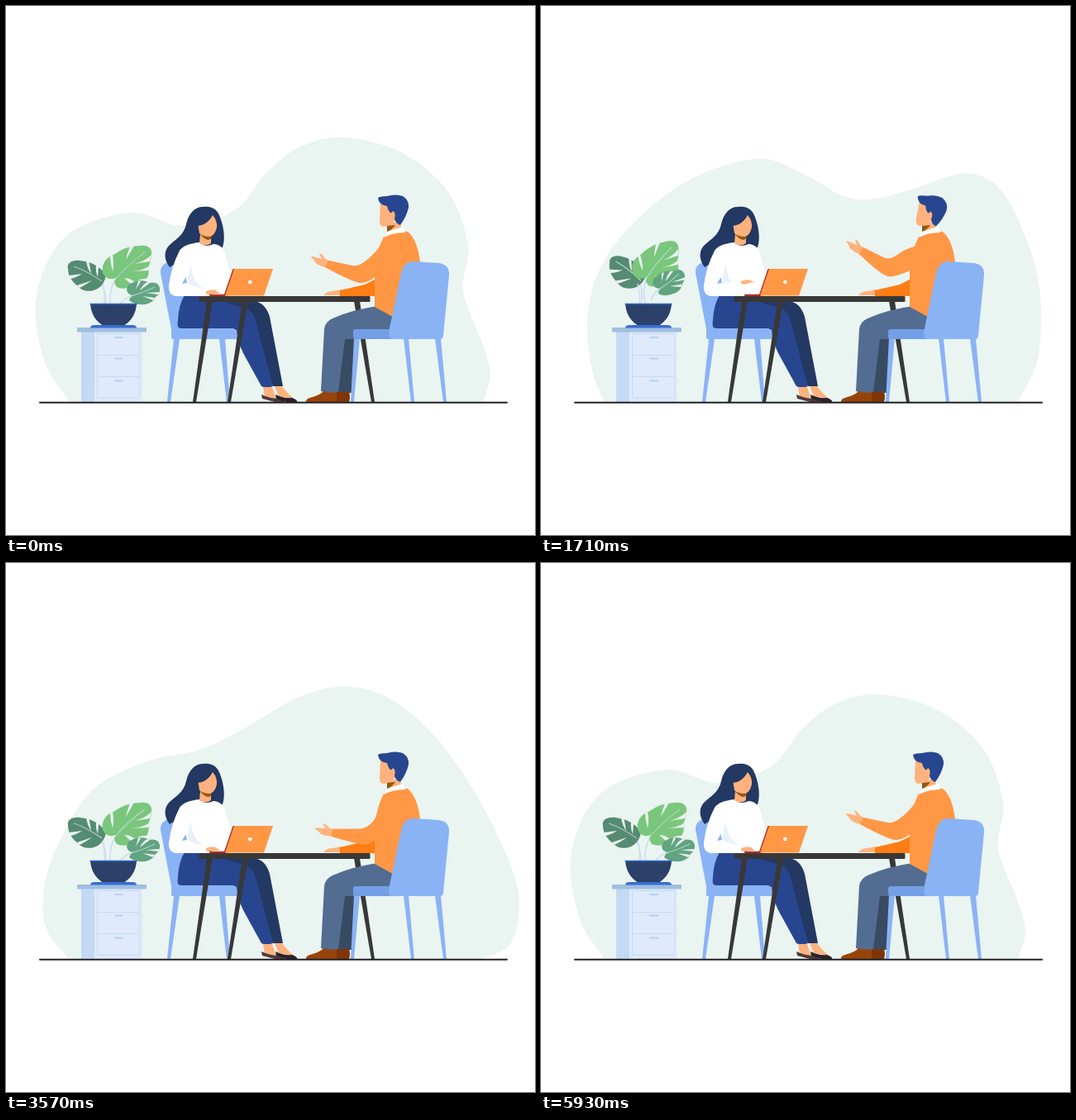
Animation of 640 by 640 pixels, one loop 6.07 s. Source, as an HTML page with a canvas:

```html
<!DOCTYPE html>
<html lang="en">
<head>
<meta charset="utf-8">
<title>Office talk</title>
<style>
html, body { margin: 0; width: 100%; height: 100%; overflow: hidden; background: #fff; }
canvas { display: block; width: 100vw; height: 100vh; }
</style>
</head>
<body>
<canvas id="stage" width="640" height="640"></canvas>
<script>
const ctx = document.getElementById('stage').getContext('2d');
const LOOP = 6070, SWAY = 3035;
const MINT = '#eaf4f1', SKY = '#8ab3f5', NAVY = '#233862', BLUE = '#284690';
const SKIN = '#ffb27d', ORANGE = '#ff9745', CHAR = '#383838', SHADE = '#915a10';

const clamp = u => Math.min(1, Math.max(0, u));
const mix = (a, b, u) => a + (b - a) * u;
const easeIn = u => u ** 3;
const easeOut = u => 1 - (1 - u) ** 3;
const ease = u => (u = clamp(u), u < .5 ? 4 * u ** 3 : 1 - 4 * (1 - u) ** 3);
// Rises around `up` and falls around `down`, each taking `len` ms.
const pulse = (t, up, down, len) => ease((t - up) / len + .5) - ease((t - down) / len + .5);

function fill(color, d) {
  ctx.fillStyle = color;
  ctx.fill(new Path2D(d));
}
function line(color, width, d) {
  ctx.strokeStyle = color;
  ctx.lineWidth = width;
  ctx.stroke(new Path2D(d));
}
function box(color, x, y, w, h, r = 0) {
  ctx.fillStyle = color;
  ctx.beginPath();
  ctx.roundRect(x, y, w, h, r);
  ctx.fill();
}
function turned(x, y, degrees, draw) {
  ctx.save();
  ctx.translate(x, y);
  ctx.rotate(degrees * Math.PI / 180);
  draw();
  ctx.restore();
}
// A tapering leg from (x, top) down to the floor at foot.
function post(color, x, top, foot, w = 7) {
  fill(color, `M${x},${top}h${w}L${foot + 4},479h-4z`);
}

// Background shape: outline from the left floor corner to the right one.
const hills = [46,428, 37,350, 72,279, 150,250, 213,266, 277,247, 315,202, 355,171,
  407,159, 478,177, 535,225, 559,290, 553,345, 575,405, 586,445];
const rising = [55,432, 46,365, 65,300, 120,248, 195,224, 255,234, 308,239, 352,218,
  395,193, 455,183, 520,200, 560,250, 568,310, 580,370, 591,425];
const wave = [62,440, 57,375, 76,310, 125,250, 190,204, 265,182, 320,202, 365,230,
  400,236, 445,225, 512,203, 555,220, 588,280, 605,345, 602,425];
const dome = [53,438, 49,395, 65,320, 110,256, 195,221, 265,208, 320,190, 370,179,
  425,175, 475,182, 525,209, 570,264, 600,330, 616,390, 607,452];
const peak = [49,445, 45,398, 62,345, 105,276, 170,242, 235,227, 295,195, 350,161,
  403,146, 455,158, 505,196, 555,260, 600,342, 621,405, 612,460];
const morphs = [
  [0, 1140, hills, rising, easeIn],
  [1140, 2050, rising, wave, easeOut],
  [2050, 3070, wave, dome, easeIn],
  [3070, 4050, dome, peak, easeOut],
  [4050, 5950, peak, hills, ease],
  [5950, LOOP, hills, hills, ease]
];

function backdrop(t) {
  const [from, to, a, b, curve] = morphs.find(m => t < m[1]) || morphs[5];
  const u = curve((t - from) / (to - from));
  const flat = a.map((v, i) => mix(v, b[i], u));
  const p = [[77, 479]];
  for (let i = 0; i < flat.length; i += 2) p.push([flat[i], flat[i + 1]]);
  p.push([577, 479]);
  ctx.beginPath();
  ctx.moveTo(...p[0]);
  for (let i = 0; i < p.length - 1; i++) {
    const q = p[i - 1] || p[i], r = p[i], s = p[i + 1], e = p[i + 2] || s;
    ctx.bezierCurveTo(r[0] + (s[0] - q[0]) / 6, r[1] + (s[1] - q[1]) / 6,
      s[0] - (e[0] - r[0]) / 6, s[1] - (e[1] - r[1]) / 6, s[0], s[1]);
  }
  ctx.fillStyle = MINT;
  ctx.fill();
}

function cabinet() {
  box('#dfeafc', 91, 394, 74, 85);
  box('#c4daf4', 91, 394, 16, 85);
  box('#a0bfdf', 86, 389, 84, 5.5, 1);
  line('#c4daf4', 1, 'M110.5,396.5H161.5V474H110.5zM110.5,422.5H161.5M110.5,448.5H161.5');
  for (const y of [400, 425.5, 452.5]) box('#b5d0f0', 131, y, 11, 2, 1);
}

// Leaves bend around the pot; all coordinates are in their resting pose.
function leaf(color, angle, shift, stem, body, cuts, rib) {
  turned(122 + shift, 362, angle, () => {
    ctx.translate(-122, -362);
    line('#c9dff0', 1.6, stem);
    fill(color, body);
    fill(MINT, cuts);
    line('#b9dcd0', 1, rib);
  });
}

function plant(t) {
  const s = t % SWAY;
  const dark = pulse(s, 885, 1900, 1000);
  const light = pulse(s, 945, 2175, 1000);
  const small = pulse(s, 1100, 2280, 1000);
  leaf('#558b73', 11 * dark, 0, 'M110,329Q120,337 121,361',
    'M75,318C73,311 80,307 89,308C104,309 115,316 121,326Q119,337 111,342C101,347 92,345 87,339C79,333 75,326 75,318z',
    'M97,308L100,308Q102,317 103,324Q98,317 97,308zM109,313L112,315L111,328Q108,321 109,313zM76,326L92,324Q84,329 78,330zM86,338L104,332Q95,338 89,341z',
    'M82,315Q97,320 116,333');
  leaf('#7ac67c', -8.5 * light, 0, 'M132,332Q125,343 126,361',
    'M117,323C115,311 122,304 130,301Q145,290 162,290C173,289 177,294 176,301Q175,310 172,316Q174,324 170,330Q160,329 157,336Q144,345 134,340Q129,334 133,329Q122,333 117,323z',
    'M126,302L129,301Q131,312 129,321Q126,311 126,302zM150,291L155,290L145,307Q147,298 150,291zM176,301L174,309L155,312Q168,309 176,301zM173,315L172,320L152,321Q165,320 173,315zM157,335L153,338L143,329Q151,329 157,335z',
    'M131,332Q146,314 168,298');
  leaf('#62a381', -17 * small, -4 * small, 'M151,351Q143,354 138,361',
    'M146,343Q147,335 158,333Q168,331 173,335Q184,333 186,341Q187,348 181,352Q177,360 168,361Q155,362 149,356Q150,352 154,350Q147,350 146,343z',
    'M171,334L174,335L162,344Q165,337 171,334zM160,333L163,333L157,343zM186,346L184,349L169,347zM180,353L178,356L165,351z',
    'M151,351Q166,347 180,340');
  line('#c9dff0', 1.3, 'M119,361Q120,348 117,336');
  fill('#2b416a', 'M102,360H158Q157,378 142,387H118Q103,378 102,360z');
  line('#2e64cd', 1.6, 'M101.5,360.5H158.5');
  fill('#3a6cd2', 'M102,389.5Q102,386 107,386H153Q158,386 158,389.5z');
}

function woman(t) {
  const raise = 12 * pulse(t % SWAY, 1040, 2220, 500);

  fill(SKY, 'M203,309Q186,310 187,323L200,391V401Q200,403 203,403H280V390H250V309z');
  post(SKY, 203, 403, 195);
  post(SKY, 258, 403, 267);

  fill(NAVY, 'M238,243C228,243 221,251 218,264C215,278 205,282 197,290C190,298 192,308 198,316L214,306L262,292C266,281 263,263 257,251C253,244 246,242 238,243z');
  fill(NAVY, 'M245,357H300Q314,359 319,376L335,460H323L296,400L250,378z');
  fill(BLUE, 'M216,350H244L276,362Q296,364 301,377L323,460Q315,463 309,460L287,420Q279,403 279,390H212Q206,390 208,380Q209,361 216,350z');

  fill(SKIN, 'M311,461H322L326,473L337,477L313,473z');
  fill(SKIN, 'M325,460H334Q339,467 348,475L330,472z');
  fill('#4b3a3d', 'M309,470Q319,475 331,475Q338,477 337,480H329L310,475z');
  fill('#2d2228', 'M326,470Q335,475 346,474Q354,477 352,480H342L327,475z');

  // Shirt, far sleeve fold and the gap under the arm
  fill('#fff', 'M234,286Q241,293 251,288Q262,288 266,302L274,332L268,351H206Q196,350 197,338Q200,315 210,296Q215,288 234,286z');
  fill('#e9f2fb', 'M224,312Q217,332 222,337L243,343Q225,337 224,312z');
  fill(SKY, 'M213,336L217.5,328L219,335z');

  fill(SKIN, 'M235,276L248,277V287Q241,292 234,287z');
  fill(SHADE, 'M235,276L249,279Q248,283 244,283Q238,281 235,276z');
  fill(SKIN, 'M232,262Q242,252 250,253Q256,260 255,268Q252,279 246,279Q239,279 234,275z');
  fill(NAVY, 'M230,266Q243,266 250,253L245,248L229,252z');

  turned(205, 347, -raise * 1.2, () => {
    fill('#fff', 'M-5,-6L20,-7L39,-5V3L-1,4z');
  });
  const y = 344 - raise;
  fill(SKIN, `M242,${y + 1}Q249,${y - 2} 254,${y}L259,${y + 4 - raise * .15}L255,${y + 4 - raise * .15}L250,${y + 4}L248,${y + 6 - raise * .1}Q244,${y + 5} 242,${y + 4}z`);
}

function laptop() {
  box('#b52f27', 246, 348.8, 20, 2.2, 1);
  fill('#b52f27', 'M274.5,318H278L268,350.5H263.5z');
  fill(ORANGE, 'M276,318H323L312,350.5H265z');
  ctx.fillStyle = '#fff';
  ctx.beginPath();
  ctx.arc(295.3, 334, 2.3, 0, 7);
  ctx.fill();
}

function table() {
  post(CHAR, 243, 357, 226);
  post(CHAR, 286, 357, 268);
  box(CHAR, 233.5, 351, 207, 7, 1);
}

// Time, inner elbow, outer elbow, wrist, hand angle
const relaxed = [424, 315, 428, 335, 388, 312, 22];
const gestures = [
  [0, ...relaxed],
  [1140, 422, 306, 421, 327, 387.5, 295, 31],
  [2430, 422, 309, 423, 330, 387, 302, 26],
  [3070, ...relaxed],
  [4070, 435, 328, 436, 345, 399, 337, 4],
  [5000, 432, 323, 438, 342, 393, 327, 12],
  [5930, ...relaxed],
  [LOOP, ...relaxed]
];

function gesture(t) {
  const i = gestures.findIndex((g, n) => n && t <= g[0]) - 1;
  const a = gestures[i], b = gestures[i + 1];
  const span = b[0] - a[0], u = (t - a[0]) / span;
  const slope = (n, k) => n < 1 || n > 5 ? 0 :
    (gestures[n + 1][k] - gestures[n - 1][k]) / (gestures[n + 1][0] - gestures[n - 1][0]);
  return relaxed.map((_, k) => {
    k++;
    return mix(a[k], b[k], u * u * (3 - 2 * u)) +
      span * u * (1 - u) * ((1 - u) * slope(i, k) - u * slope(i + 1, k));
  });
}

function arm(t) {
  const [ix, iy, ox, oy, wx, wy, angle] = gesture(t);
  turned(wx, wy, angle, () =>
    fill(SKIN, 'M3,-4L-4,-5Q-11,-10 -13,-8L-8,-3.5L-20,-2Q-22,0 -17,1L-13,4Q-6,6 3,4z'));
  const tilt = angle * Math.PI / 180, cx = 4.7 * Math.sin(tilt), cy = 4.7 * Math.cos(tilt);
  fill(ORANGE, `M${wx + cx},${wy - cy}L${ix - 5},${iy - 1}Q${ix + 2},${iy} ${ix + 9},${iy - 5}
    Q${ix + 20},${iy - 13} 452,291L472,284L468,318L448,${oy - 8}Q${ox + 8},${oy + 1} ${ox},${oy}
    Q${ox - 9},${oy - 1} ${wx - cx},${wy + cy}z`);
}

function man(t) {
  fill('#384b63', 'M408,398H428L418,468H400z');
  post(CHAR, 421, 357, 442);
  fill('#526d91', 'M450,363Q420,367 395,378Q386,382 385,391L381,466Q392,470 402,467L410,403H470V364z');
  fill('#97440b', 'M363,479Q362,475 371,473Q381,470 384,466Q393,469 402,467V479z');
  fill('#7f3506', 'M400,467H415Q417,473 415,479H400z');

  fill(SKIN, 'M384,350Q388,345 395,345L406,343V350z');
  fill('#ff7d14', 'M404,344L434,337L448,330V351H404z');

  fill(ORANGE, 'M457,279Q470,271 486,273Q498,283 501,310L485,375H466L446,364V320Q448,296 457,279z');
  fill(SKIN, 'M461,262L477,262L478,270L461,276z');
  fill('#fff', 'M457,280L461,273L477,268L481,267L483,274Q468,274 457,280z');
  fill(SHADE, 'M461,266L471,265Q468,270 461,273z');

  turned(466, 272, 8 * pulse(t, 1210, 3040, 1300), () => {
    ctx.translate(-466, -272);
    fill(SKIN, 'M453,238H472L471,259Q465,267 456,267Q452,266 452,260z');
    fill(BLUE, 'M450,232Q453,230 461,230Q472,227 480,230Q488,235 487,244Q484,256 477,265Q471,263 470,257Q472,250 468,248Q466,252 464,249Q462,247 461,242Q451,241 450,232z');
  });
  arm(t);
}

function manChair() {
  post(SKY, 421, 402, 417);
  post(SKY, 481, 402, 490, 6);
  post(SKY, 519, 402, 529);
  box('#729fe6', 420, 391, 60, 12, 3);
  fill(SKY, 'M492,309L524,311Q537,313 536,326L529,399Q529,403 525,403H466Q462,402 464,390L478,323Q482,309 492,309z');
}

function render(now) {
  const t = now % LOOP;
  ctx.fillStyle = '#fff';
  ctx.fillRect(0, 0, 640, 640);
  backdrop(t);
  cabinet();
  plant(t);
  woman(t);
  laptop();
  man(t);
  table();
  manChair();
  ctx.lineCap = 'round';
  line('#222226', 2, 'M41,479.7H606');
  ctx.lineCap = 'butt';
}

const start = performance.now();
function tick() {
  render(performance.now() - start);
  requestAnimationFrame(tick);
}
tick();
</script>
</body>
</html>
```
